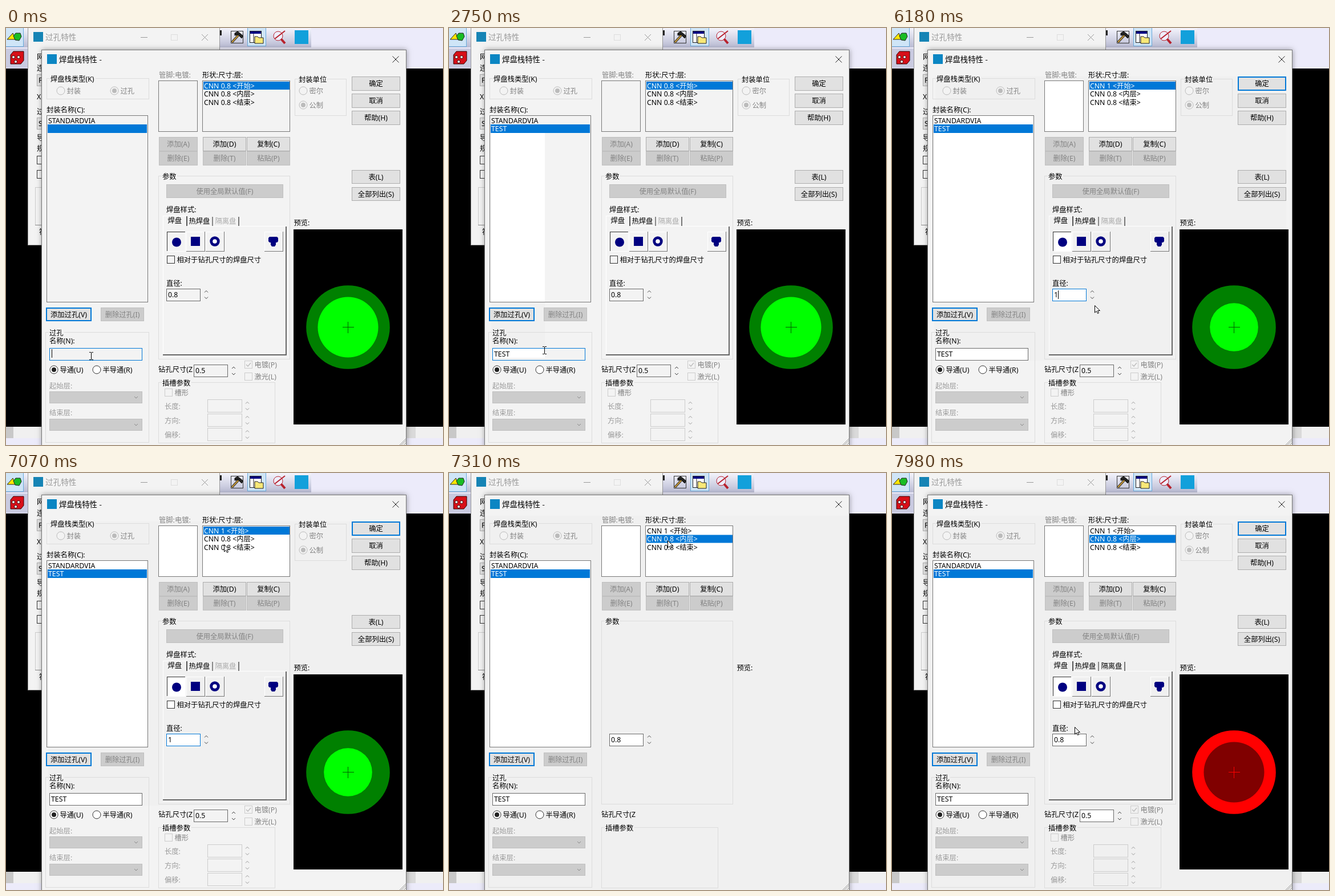
Write an HTML page with a canvas that moves like this. It is 766 px wide and 731 px high and loops after 8 s.

```html
<!DOCTYPE html>
<html lang="zh-CN">
<head>
<meta charset="utf-8">
<title>焊盘栈特性</title>
<style>
html, body { margin: 0; width: 100%; height: 100%; overflow: hidden; background: #000 }
canvas { display: block }
</style>
</head>
<body>
<canvas id="stage" width="766" height="731"></canvas>
<script>
const g = document.getElementById('stage').getContext('2d');
const BLUE = '#0078d7', NAVY = '#000080', GREY = '#838383', DULL = '#f3f3f3', LOOP = 8000;
let now = 0;

// Areas that brighten once they are repainted: time, left, top, right, bottom
const repaints = [
  [1380, 74, 172, 168, 578], [3270, 180, 349, 318, 543], [3420, 108, 161, 420, 578],
  [3660, 345, 104, 420, 461], [4800, 76, 85, 691, 583], [7190, 64, 75, 701, 730]
];

// Pointer steps: time, x, y, kind (I = text beam, A = arrow, blank = hidden)
const pointer = [
  [0, 149, 575, 'I'], [390, 158, 573, 'I'], [510, 165, 571, 'I'], [1380, 0, 0, ''],
  [2750, 167, 565, 'I'], [2870, 160, 556, 'I'], [3120, 179, 529, 'A'], [3270, 308, 349, 'A'],
  [3420, 375, 180, 'A'], [3540, 400, 112, 'A'], [3660, 409, 104, 'A'], [3780, 406, 140, 'A'],
  [3900, 400, 230, 'A'], [4020, 390, 330, 'A'], [4140, 378, 427, 'A'], [4260, 355, 446, 'A'],
  [4410, 334, 467, 'I'], [4560, 324, 468, 'I'], [5090, 310, 472, 'I'], [5210, 285, 480, 'I'],
  [5330, 262, 486, 'I'], [5460, 258, 488, 'I'], [5700, 320, 490, 'A'], [5820, 355, 486, 'A'],
  [6440, 358, 410, 'A'], [6560, 366, 295, 'A'], [6710, 373, 205, 'A'], [6830, 379, 150, 'A'],
  [6950, 382, 125, 'A'], [7310, 383, 118, 'A'], [7710, 357, 247, 'A'], [7860, 336, 380, 'A'],
  [7980, 320, 445, 'A']
];

const latest = list => list.filter(s => now >= s[0]).pop();
const during = (a, b) => now >= a && now < b;

function fill(x, y, w, h, color) {
  g.fillStyle = color;
  g.fillRect(x, y, w, h);
}
function outline(x0, y0, x1, y1, color, width = 1) {
  g.strokeStyle = color;
  g.lineWidth = width;
  g.strokeRect(x0 + width / 2, y0 + width / 2, x1 - x0 - width, y1 - y0 - width);
}
function path(points, stroke, fillColor, width = 1) {
  g.beginPath();
  points.forEach(([x, y]) => g.lineTo(x, y));
  if (fillColor) { g.closePath(); g.fillStyle = fillColor; g.fill(); }
  if (stroke) { g.strokeStyle = stroke; g.lineWidth = width; g.stroke(); }
}
function disc(x, y, r, color, stroke) {
  g.beginPath();
  g.arc(x, y, r, 0, 7);
  g.fillStyle = color;
  g.fill();
  if (stroke) { g.strokeStyle = stroke; g.lineWidth = 1; g.stroke(); }
}
function text(s, x, y, color = '#000', size = 12.3, align = 'left') {
  g.font = `${size}px "Noto Sans", "Noto Sans CJK SC", sans-serif`;
  g.textAlign = align;
  g.fillStyle = color;
  g.fillText(s, x, y + 4.5);
}
function surface(x0, y0, x1, y1, color) {
  fill(x0, y0, x1 - x0, y1 - y0, DULL);
  for (const [t, l, u, r, d] of repaints) {
    const x = Math.max(x0, l), y = Math.max(y0, u), w = Math.min(x1, r) - x, h = Math.min(y1, d) - y;
    if (now >= t && w > 0 && h > 0) fill(x, y, w, h, color);
  }
}

function button(label, x0, y0, x1, y1, style = '') {
  const off = style === 'off';
  fill(x0, y0, x1 - x0, y1 - y0, off ? '#ccc' : '#e1e1e1');
  outline(x0, y0, x1, y1, style === 'focus' ? BLUE : off ? '#bfbfbf' : '#adadad', style === 'focus' ? 2 : 1);
  text(label, (x0 + x1) / 2, (y0 + y1) / 2, off ? GREY : '#000', 12.3, 'center');
}
function group(label, x0, y0, x1, y1, gap) {
  outline(x0, y0, x1, y1, '#dcdcdc');
  surface(x0 + 6, y0 - 2, x0 + 8 + gap, y0 + 3, '#f0f0f0');
  text(label, x0 + 7, y0 + 1);
}
function radio(label, x, y, on, off) {
  disc(x, y, 7, off ? DULL : '#fff', off ? '#bbb' : '#333');
  if (on) disc(x, y, 4, off ? '#bbb' : '#222');
  text(label, x + 10.5, y, off ? GREY : '#000');
}
function check(label, x, y, on, off) {
  surface(x, y, x + 14, y + 14, off ? '#f0f0f0' : '#fff');
  outline(x, y, x + 14, y + 14, off ? '#ccc' : '#333');
  if (on) path([[x + 3, y + 7], [x + 6, y + 10], [x + 11, y + 4]], '#bbb', null, 1.3);
  text(label, x + 17.5, y + 7.5, off ? GREY : '#000');
}
function field(value, x0, y0, x1, y1, focus) {
  surface(x0, y0, x1, y1, '#fff');
  outline(x0, y0, x1, y1, focus ? BLUE : '#6a6a6a');
  text(value, x0 + 3, (y0 + y1) / 2 - .5);
}
function chevron(x, y, up, color) {
  const d = up ? -3 : 3;
  path([[x - 3, y], [x, y + d], [x + 3, y]], color);
}
function spinner(x, y, color = '#444') {
  chevron(x, y - 4, true, color);
  chevron(x, y + 4, false, color);
}
function cross(x, y, r, color) {
  path([[x - r, y - r], [x + r, y + r]], color);
  path([[x + r, y - r], [x - r, y + r]], color);
}
function caret(x, y) { fill(x, y, 1, 15, '#000'); }

function backdrop() {
  fill(0, 0, 766, 731, '#000');
  fill(0, 0, 766, 71, '#ecebfa');
  const bar = g.createLinearGradient(0, 0, 0, 34);
  bar.addColorStop(0, '#f4f4fc');
  bar.addColorStop(1, '#b9bbd3');
  fill(0, 0, 535, 34, bar);
  fill(0, 36, 40, 34, '#c9cae0');
  fill(0, 699, 766, 20, '#f0f0f0');
  fill(0, 699, 13, 20, '#c8c8c8');
  fill(702, 699, 16, 20, '#dadada');
  fill(0, 719, 766, 12, '#ecebfa');

  fill(0, 0, 31, 32, '#cfe5f7');
  outline(-1, -1, 31, 33, '#68a9dc');
  path([[2, 20], [12, 9], [16, 20]], '#222', '#ffe600');
  path([[13, 14], [17, 9], [25, 9], [27, 15], [23, 22], [16, 21]], '#222', '#18bd24');
  path([[8, 47], [13, 41], [31, 41], [31, 57], [26, 63], [8, 63]], '#300', '#d80f18');
  for (const [x, y] of [[13, 51], [22, 51], [17, 59]]) disc(x, y, 2.5, '#fff', '#300');

  path([[396, 25], [408, 12]], '#222', null, 4);
  path([[396, 25], [408, 12]], '#c99a36', null, 2);
  path([[401, 9], [406, 6], [416, 14], [413, 18], [407, 12], [401, 13]], '#111', '#222');
  outline(394, 5, 416, 27, '#333');
  fill(423, 0, 32, 32, '#cfe5f7');
  outline(423, -1, 456, 32, '#68a9dc');
  fill(428, 6, 19, 19, '#fff');
  outline(427, 5, 448, 26, '#222');
  fill(428, 6, 19, 4, NAVY);
  path([[434, 10], [434, 25]], '#222');
  path([[436, 15], [441, 15], [443, 17], [451, 17], [451, 27], [436, 27]], '#222', '#f8e878');
  disc(477, 14, 8, '#eef', '#b8222d');
  path([[482, 19], [489, 27]], '#b8222d', null, 4);
  path([[471, 19], [489, 5]], '#b8222d', null, 2);
  fill(506, 4, 24, 24, '#12a0db');
  fill(375, 4, 3, 9, '#222');
}

function rearDialog() {
  fill(38, 0, 337, 381, DULL);
  outline(38, -1, 375, 381, '#999');
  fill(48, 7, 17, 17, '#1684b5');
  text('过孔特性', 69, 16, '#999', 13.6);
  path([[236, 16.5], [248, 16.5]], '#999');
  outline(289, 11, 301, 22, '#ddd');
  cross(348.5, 16.5, 5.5, '#999');
  [['网', 50], ['连', 70], ['X', 120], ['过', 146], ['导', 192], ['规', 211]]
    .forEach(([s, y]) => text(s, 54, y));
  for (const [s, y] of [['F', 81], ['S', 157]]) {
    fill(54, y, 20, 21, '#e1e1e1');
    outline(54, y, 75, y + 21, '#adadad');
    text(s, 57, y + 10);
  }
  outline(54, 224, 69, 239, '#333');
  outline(54, 249, 69, 264, '#333');
  outline(51, 279, 80, 346, '#ccc');
  fill(51, 345, 14, 1, '#888');
  text('符', 58, 357);
}

function leftPanel(level) {
  group('焊盘栈类型(K)', 71, 88, 251, 125, 78);
  radio('封装', 96, 110, false, true);
  radio('过孔', 190, 110, true, true);
  text('封装名称(C):', 71, 143);
  const typed = 'TEST'.slice(0, [1380, 1630, 2130, 2250].filter(t => now >= t).length);
  surface(71, 153, 249, 481, '#fff');
  outline(71, 153, 249, 481, '#777');
  text('STANDARDVIA', 74, 162);
  fill(73, 169, 174, 15, BLUE);
  text(typed, 74, 176.5, '#fff');
  button('添加过孔(V)', 70, 490, 150, 514, 'focus');
  button('删除过孔(I)', 166, 490, 242, 514, 'off');
  group(level ? '过孔' : '', 69, 533, 251, 727, 25);
  if (!level) return;
  text('名称(N):', 76, 548);
  const focused = now < 4800;
  field(typed, 76, 561, 239, 583, focused);
  const dark = during(510, 1010) || during(2750, 3420) || during(3900, 4410);
  if (focused && !dark) {
    g.font = '12.3px "Noto Sans", sans-serif';
    caret(Math.round(80 + g.measureText(typed).width), 563);
  }
  radio('导通(U)', 84, 599, true);
  radio('半导通(R)', 159, 599, false);
  for (const [label, y] of [['起始层:', 627], ['结束层:', 674]]) {
    const top = y === 627 ? 637 : 685;
    text(label, 76, y, '#9a9a9a');
    fill(76, top, 163, 21, '#ccc');
    outline(76, top, 239, top + 21, '#bfbfbf');
    chevron(228, top + 9, false, '#888');
  }
}

function shapeLists(level, row, diameter) {
  button('复制(C)', 422, 191, 498, 216);
  button('删除(T)', 345, 216, 421, 241, 'off');
  button('粘贴(P)', 422, 216, 498, 241, 'off');
  if (!level) return;
  text('管脚:电镀:', 268, 82, GREY);
  text('形状:尺寸:层:', 344, 82);
  for (const [x0, x1] of [[267, 336], [344, 498]]) {
    surface(x0, 92, x1, 182, '#fff');
    outline(x0, 92, x1, 182, '#777');
  }
  fill(346, 94 + row * 14.5, 151, 14, BLUE);
  ['开始', '内层', '结束'].forEach((name, i) =>
    text(`CNN ${i ? '0.8' : diameter} <${name}>`, 347, 101 + i * 14.5, i === row ? '#fff' : '#000'));
  button('添加(A)', 268, 191, 336, 216, 'off');
  button('删除(E)', 268, 216, 336, 241, 'off');
  button('添加(D)', 345, 191, 421, 216);
}

function toolButton(x, pressed) {
  if (pressed) surface(x, 357, x + 32, 391, '#fff');
  fill(x, 357, 32, 1, pressed ? '#333' : '#fff');
  fill(x, 357, 1, 34, pressed ? '#333' : '#fff');
  fill(x, 391, 33, 1, pressed ? '#fff' : '#777');
  fill(x + 32, 357, 1, 35, pressed ? '#fff' : '#777');
}

function parameters(level, row, diameter) {
  if (level) group('参数', 267, 259, 498, 581, 25);
  if (level > 1) {
    button('使用全局默认值(F)', 281, 274, 486, 298, 'off');
    text('焊盘样式:', 281, 318);
    fill(275, 329, 41, 1, '#fff');
    fill(275, 329, 1, 243, '#fff');
    fill(318, 347, 172, 1, '#fff');
    fill(490, 348, 2, 225, '#666');
    fill(275, 572, 217, 2, '#666');
    fill(316, 330, 2, 17, '#555');
    fill(361, 331, 2, 16, '#888');
    fill(407, 331, 2, 16, '#777');
    text('焊盘', 283.5, 337.5);
    text('热焊盘', 320.5, 338.5);
    text('隔离盘', 366.5, 338.5, row ? '#000' : '#aaa');
    [282, 316, 350, 453].forEach((x, i) => toolButton(x, i === 0));
    disc(299, 375.5, 8, NAVY);
    fill(324, 366, 16, 16, NAVY);
    disc(366, 374, 8.7, NAVY);
    disc(366, 374, 3.8, '#fff');
    path([[462, 366], [475, 366], [477, 368], [477, 374], [475, 376], [473, 376], [473, 380],
      [471, 383], [466, 383], [464, 380], [464, 376], [462, 376], [460, 374], [460, 368]], null, NAVY);
    check('相对于钻孔尺寸的焊盘尺寸', 282, 399, false);
    text('直径:', 281, 447);
  }
  const value = row ? '0.8' : diameter;
  const editing = during(4800, 7190);
  field(value, 281, 457, 341, 479, editing);
  if (during(5210, 5940)) {
    fill(284, 460, 20, 16, BLUE);
    text(value, 284, 467.5, '#fff');
  } else if (during(4800, 6710)) caret(diameter === '1' ? 291 : 303, 460);
  spinner(351, 467.5);
}

function drillAndSlot(level) {
  if (!level) return;
  text('钻孔尺寸(Z', 267, 598);
  group('插槽参数', 267, 621, 472, 728, 50);
  if (level < 2) return;
  field('0.5', 329, 590, 389, 612);
  spinner(399, 601);
  check('电镀(P)', 418, 583, true, true);
  check('激光(L)', 418, 604, false, true);
  if (level < 3) return;
  check('槽形', 278, 632, false, true);
  ['长度:', '方向:', '偏移:'].forEach((label, i) => {
    const y = 663 + i * 25, pending = level < 4 && i === 2;
    text(label, 278, y, pending ? '#fff' : '#9a9a9a');
    if (pending) return;
    outline(353, y - 12, 414, y + 11, '#ccc');
    spinner(423, y - .5, '#999');
  });
}

function rightPanel(level, row, diameter) {
  text('预览:', 504.5, 341);
  if (level < 4) return;
  group('封装单位', 506, 89, 597, 154, 49);
  radio('密尔', 521, 110, false, true);
  radio('公制', 521, 135, true, true);
  button('确定', 606, 85, 691, 110, now >= 4800 ? 'focus' : '');
  button('取消', 606, 115, 691, 140);
  button('帮助(H)', 606, 145, 691, 170);
  button('表(L)', 606, 249, 691, 273);
  button('全部列出(S)', 606, 279, 691, 303);
  fill(504, 353, 191, 342, '#000');
  disc(599.5, 524.5, 73.3, row ? '#f00' : '#008000');
  disc(599.5, 524.5, !row && diameter === '1' ? 42.3 : 53, row ? '#800000' : '#0f0');
  const mark = row ? '#f00' : '#006000';
  fill(590, 524, 20, 1, mark);
  fill(599, 515, 1, 20, mark);
}

function drawPointer() {
  const [, x, y, kind] = latest(pointer);
  if (kind === 'A') {
    path([[0, 0], [0, 12.5], [3, 9.8], [5, 14], [7, 13], [5, 9], [9, 9], [0, 0]]
      .map(([dx, dy]) => [x + dx + .5, y + dy + .5]), '#000', '#fff');
  } else if (kind === 'I') {
    fill(x, y - 6, 1, 12, '#000');
    for (const end of [-7, 6]) {
      fill(x - 3, y + end, 3, 1, '#000');
      fill(x + 1, y + end, 3, 1, '#000');
    }
  }
}

function draw() {
  now = performance.now() % LOOP;
  const level = latest([[0, 4], [7190, 0], [7310, 1], [7460, 2], [7590, 3], [7710, 4]])[1];
  const row = now >= 7190 ? 1 : 0;
  const diameter = now >= 5940 ? '1' : '0.8';
  backdrop();
  rearDialog();
  g.shadowColor = 'rgba(0,0,0,.4)';
  g.shadowBlur = 9;
  fill(63, 38, 639, 700, DULL);
  g.shadowBlur = 0;
  g.shadowColor = 'transparent';
  surface(64, 73, 701, 731, '#f0f0f0');
  outline(62, 38, 702, 740, '#777');
  fill(72, 46, 17, 17, '#0b86c3');
  text('焊盘栈特性 -', 93, 55, '#000', 13.4);
  cross(683, 55, 5.5, '#222');
  for (const d of [4, 8, 11]) path([[701 - d, 731], [701, 731 - d]], '#999');
  leftPanel(level);
  shapeLists(level, row, diameter);
  parameters(level, row, diameter);
  drillAndSlot(level);
  rightPanel(level, row, diameter);
  drawPointer();
  requestAnimationFrame(draw);
}
requestAnimationFrame(draw);
</script>
</body>
</html>
```
